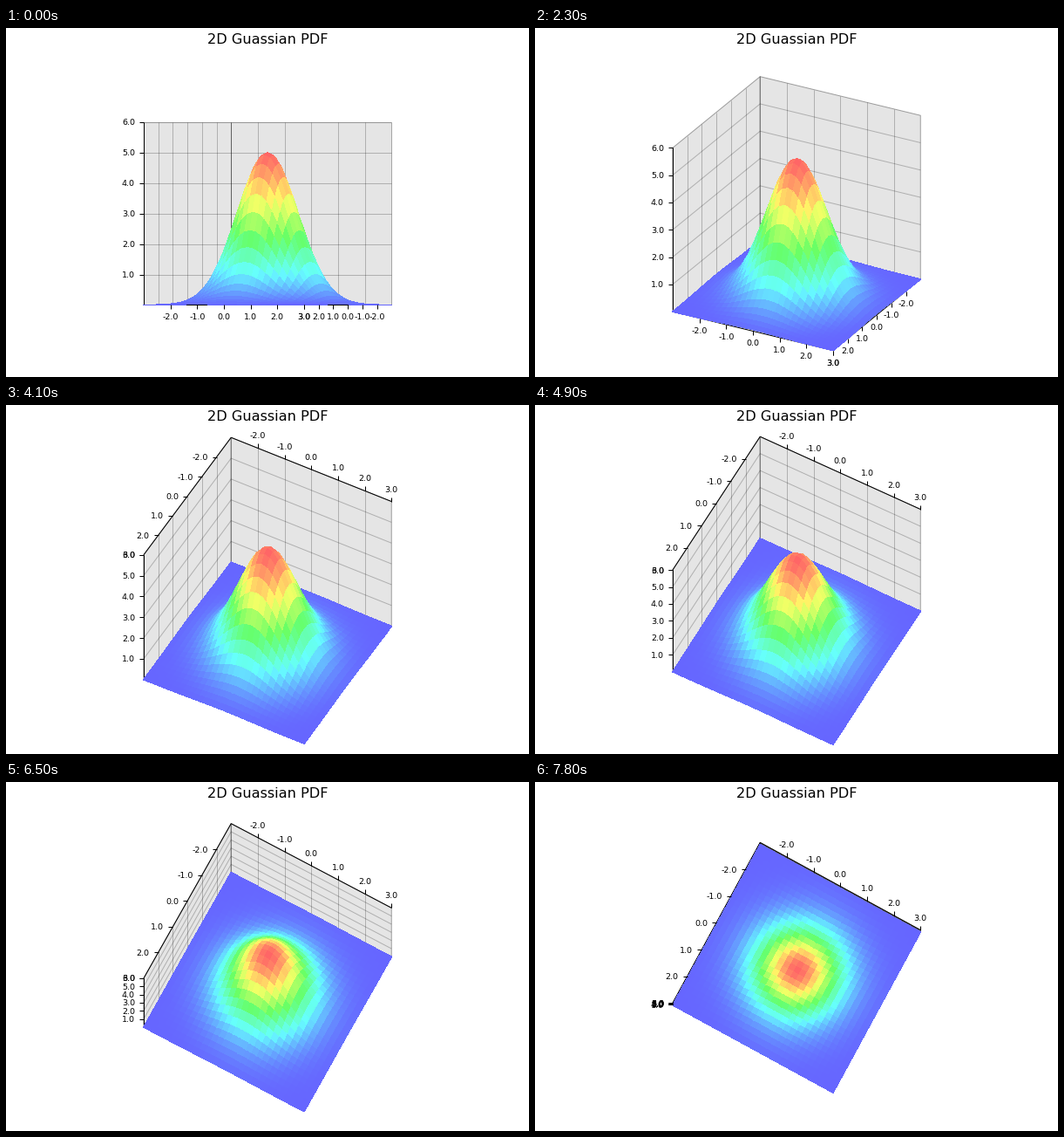
A matplotlib script that plays this animation: 600x400 px, repeating every 8000 ms.

```python
import colorsys

import numpy as np
import matplotlib.pyplot as plt
from matplotlib.animation import FuncAnimation
from matplotlib.collections import LineCollection, PolyCollection

W, H, DPI = 600, 400, 100
PX = 72 / DPI                    # points per pixel
FRAMES, INTERVAL = 80, 100
STEP, LAST = 0.02, 78            # tilt per frame in radians, last tilt step
CX, CY, UNIT = 300.1, 212.67, 34.93
AZ = np.radians(28.6)
Y_FLIP, X_FLIP = 0.575, 0.69     # tilt at which an axis moves to the top edge
TICK = 5
SIDES = {"left": (-1, 0, 10), "up": (0, -1, 14.5), "down": (0, 1, 13.5)}

fig = plt.figure(figsize=(W / DPI, H / DPI), dpi=DPI, facecolor="white")
ax = fig.add_axes([0, 0, 1, 1])
ax.set(xlim=(0, W), ylim=(H, 0))
ax.axis("off")
plt.rcParams["font.family"] = "DejaVu Sans"


def project(x, y, z, el):
    """Orthographic view, in pixels, of the box [-3,3] x [-3,3] x [0,6]."""
    c, s = np.cos(AZ), np.sin(AZ)
    x, y, z = np.broadcast_arrays(x, y, z)
    sx = CX + UNIT * (x * c - y * s)
    sy = CY + UNIT * ((x * s + y * c) * np.sin(el) - (z - 3) * np.cos(el))
    return np.stack([sx, sy], axis=-1)


def path(points, el):
    return project(*np.transpose(points), el)


# Surface: flat cells, listed from the far corner to the near one
g = np.linspace(-3, 3, 31)
GX, GY = np.meshgrid(g, g, indexing="ij")
GZ = 5 * np.exp(-(GX**2 + GY**2) / 2)


def cell_color(z):
    return colorsys.hsv_to_rgb((1 - z / 5) * 2 / 3, 0.6, 1)


def surface(el):
    p = project(GX, GY, GZ, el)
    quads = [p[:-1, :-1], p[1:, :-1], p[1:, 1:], p[:-1, 1:]]
    return np.stack(quads, axis=2).reshape(-1, 4, 2)


# Back walls and their grid
WALLS = [
    [(-3, 3, 0), (-3, -3, 0), (-3, -3, 6), (-3, 3, 6)],
    [(-3, -3, 0), (3, -3, 0), (3, -3, 6), (-3, -3, 6)],
]
GRID = [[(-3, 3, z), (-3, -3, z), (3, -3, z)] for z in range(1, 6)]
for t in range(-2, 3):
    GRID.append([(-3, t, 0), (-3, t, 6)])
    GRID.append([(t, -3, 0), (t, -3, 6)])

TICKS = np.arange(-2, 4)
Z_TICKS = np.arange(1, 7)


def lines(color, alpha, order):
    return ax.add_collection(LineCollection(
        [], colors=color, alpha=alpha, linewidths=PX, zorder=order))


def label(value):
    return ax.text(0, 0, f"{value:.1f}", fontsize=9.5 * PX, va="baseline",
                   color="black", zorder=6)


walls = ax.add_collection(PolyCollection(
    [], facecolors="#e5e5e5", edgecolors="none", zorder=1))
grid = lines("black", 0.23, 2)
outline = lines("black", 0.35, 2.5)
axes_lines = lines("black", 1, 3)
mesh = ax.add_collection(PolyCollection(
    [], facecolors=[cell_color(z) for z in GZ[:-1, :-1].ravel()],
    edgecolors="face", linewidths=0.5 * PX, antialiaseds=False, zorder=4))
ticks = lines("black", 1, 5)
x_labels = [label(t) for t in TICKS]
y_labels = [label(t) for t in TICKS]
z_labels = [label(t) for t in Z_TICKS]
ax.text(W / 2, 18, "2D Guassian PDF", fontsize=16.1 * PX, ha="center",
        va="baseline", color="black")


def place(labels, points, side):
    """Put labels beside the points and return the tick segments."""
    dx, dy, gap = SIDES[side]
    for text, (x, y) in zip(labels, points):
        text.set_position((x + dx * gap, y + dy * gap + 3.5))
        text.set_ha("right" if side == "left" else "center")
    return [[(x, y), (x + dx * TICK, y + dy * TICK)] for x, y in points]


def update(i):
    el = STEP * min(i, LAST)
    faces = [path(w, el) for w in WALLS]
    walls.set_verts(faces)
    outline.set_segments([np.vstack([f, f[:1]]) for f in faces])
    grid.set_segments([path(s, el) for s in GRID])
    mesh.set_verts(surface(el))

    x_top, y_top = el >= X_FLIP, el >= Y_FLIP
    x_at = (-3, 6) if x_top else (3, 0)
    y_at = (-3, 6) if y_top else (3, 0)
    ends = np.array([-3, 3])
    axes_lines.set_segments([
        project(ends, *x_at, el),
        project(y_at[0], ends, y_at[1], el),
        project(-3, 3, np.array([0, 6]), el),
    ])
    ticks.set_segments(
        place(x_labels, project(TICKS, *x_at, el), "up" if x_top else "down")
        + place(y_labels, project(y_at[0], TICKS, y_at[1], el),
                "left" if y_top else "down")
        + place(z_labels, project(-3, 3, Z_TICKS, el), "left"))
    return []


anim = FuncAnimation(fig, update, frames=FRAMES, interval=INTERVAL,
                     init_func=lambda: update(0), repeat=True, repeat_delay=0)
plt.show()
```
